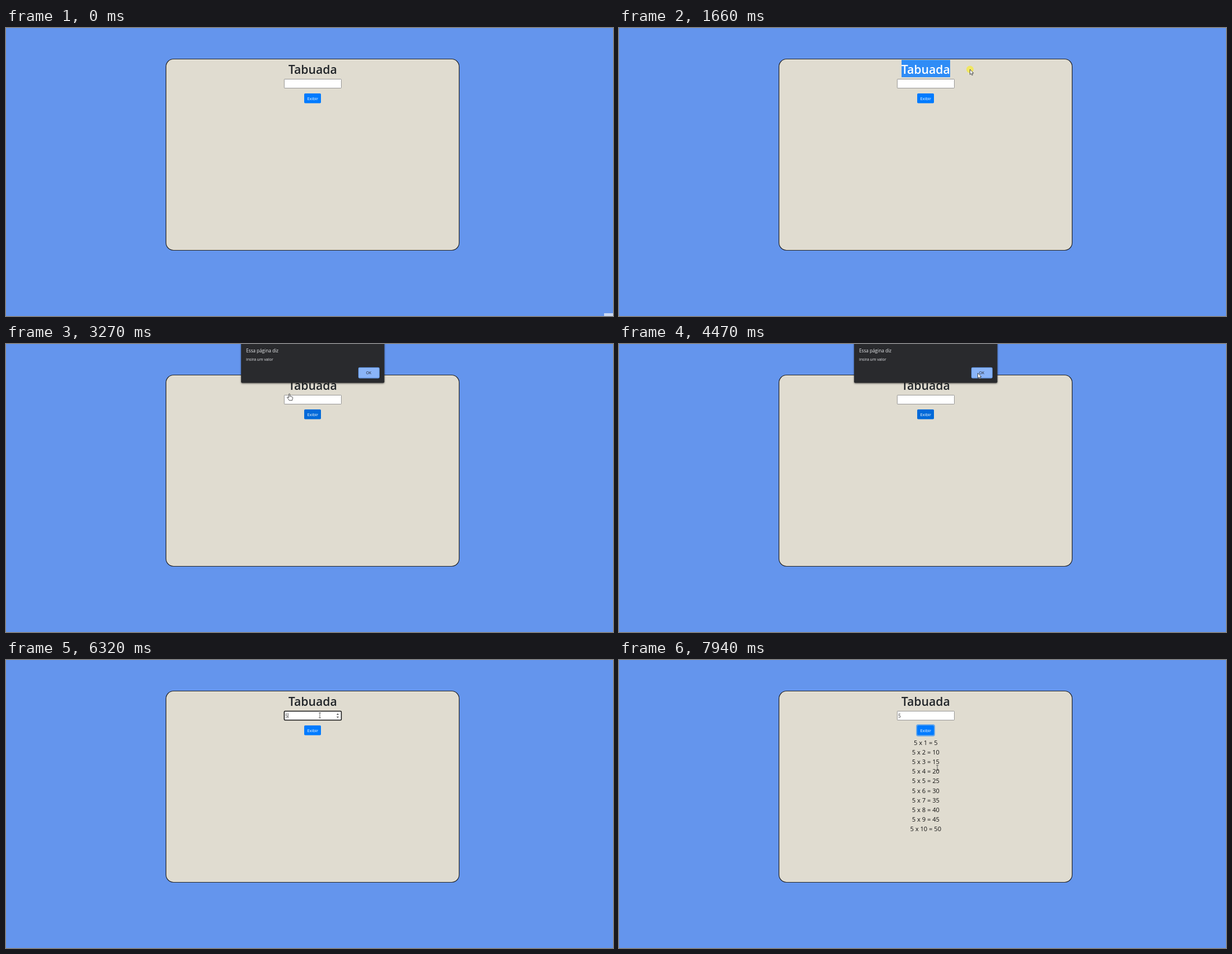
An HTML page for the animation above (8 s loop, 1087 by 515 pixels).

```html
<!DOCTYPE html>
<html lang="pt">
<head>
<meta charset="utf-8">
<title>Tabuada</title>
<style>
  html, body { margin: 0; width: 100%; height: 100%; overflow: hidden; background: #6495ed; }
  svg { display: block; font-family: "Open Sans", "Noto Sans", sans-serif; }
  .mid { text-anchor: middle; }
  .h1 { font-size: 21.2px; font-weight: 600; }
  #dialog { filter: drop-shadow(0 1px 1.5px rgba(0, 0, 0, .6)); }
</style>
</head>
<body>
<svg width="1087" height="515" viewBox="0 0 1087 515">
  <defs><clipPath id="clip"><rect id="clipRect" x="506" y="57" height="31"/></clipPath></defs>
  <rect id="corner" x="1071" y="510" width="16" height="5" fill="#cbdaf4"/>
  <rect x="286.5" y="55.5" width="525" height="342" rx="13.5" fill="#e0dcd0" stroke="#202226" stroke-width="1.2"/>

  <text class="mid h1" x="549.3" y="81.8" fill="#212529">Tabuada</text>
  <g clip-path="url(#clip)">
    <rect x="506" y="57" width="87" height="31" fill="#2f8cf6"/>
    <text class="mid h1" x="549.3" y="81.8" fill="#fff">Tabuada</text>
  </g>

  <rect id="field" x="498.3" y="91.5" width="102.2" height="16" fill="#fff"/>
  <text id="digit" x="500" y="103" font-size="8.4" fill="#333">5</text>
  <path id="caret" d="M0 95V104" stroke="#222" stroke-width=".7"/>
  <path id="spin" d="M591.8 98l2.2-2.4 2.2 2.4zM591.8 101.3l2.2 2.4 2.2-2.4z" fill="#505050"/>

  <rect id="ring" x="533.1" y="116" width="31.8" height="19.4" rx="2.6" fill="none" stroke="#007bff" stroke-opacity=".55" stroke-width="2"/>
  <rect id="button" x="534" y="117" width="30" height="17.5" rx="1.8"/>
  <text class="mid" x="549.2" y="128.8" font-size="7.5" fill="#fff">Exibir</text>
  <g id="rows" class="mid" font-size="11.1" fill="#111"></g>

  <g id="dialog">
    <path d="M421-20H677.5V67.5q0 2-2 2H423q-2 0-2-2Z" fill="#292a2d"/>
    <text x="430" y="14.5" font-size="8.2" fill="#e8eaed">Essa página diz</text>
    <text x="430" y="30.4" font-size="7" fill="#e8eaed">insira um valor</text>
    <rect x="631.5" y="42.3" width="36.8" height="18.5" rx="1.8" fill="#8ab4f8" stroke="#6a9ff0" stroke-width="1.2"/>
    <text class="mid" x="649.5" y="54" font-size="6.8" fill="#202124">OK</text>
  </g>

  <g id="cursor" stroke-linejoin="round">
    <circle id="halo" r="6.5" fill="#f5ea3c" opacity=".75"/>
    <path id="arrow" d="M0 0V9.2L2.1 7.3 3.5 10.5 5 9.8 3.7 6.8H6.5Z" fill="#fff" stroke="#222" stroke-width=".8"/>
    <path id="hand" d="M-1 1a1 1 0 0 1 2 0V4.5l3.6.8q1.4.4 1.4 2q0 2-1 3.5v1H-.3Q-2 9-3.8 7q-.6-1 .3-1.3q.8-.2 2.5 1.3Z" fill="#fff" stroke="#222" stroke-width=".8"/>
    <path id="beam" d="M-2-4.5H2M-2 4.5H2M0-4.5V4.5" fill="none" stroke="#444" stroke-width=".8"/>
  </g>
</svg>
<script>
const LOOP = 8000;
const $ = id => document.getElementById(id);
const set = (id, attrs) => { for (const k in attrs) $(id).setAttribute(k, attrs[k]); };
const show = (id, on) => { $(id).style.display = on ? '' : 'none'; };
const clamp = v => Math.max(0, Math.min(1, v));
const between = (v, a, b) => v >= a && v < b;
const ease = p => p * p * (3 - 2 * p);

// Places the pointer visits
const corner = [1083, 505], title = [566, 78], left = [481.5, 75], right = [628.5, 74],
  field = [562, 99], button = [549.5, 123], message = [427, 24], ok = [642.5, 52],
  above = [536.8, 110.5], beside = [591, 171], row = [570, 193];

// Pointer moves: start, end, destination
const moves = [
  [70, 820, title], [820, 960, left], [1160, 1500, right], [1720, 2150, field],
  [2300, 2710, button], [2960, 3750, message], [3750, 4400, ok], [4620, 4870, above],
  [4940, 5150, field], [6400, 6800, button], [7150, 7800, beside], [7800, 7940, row]
];

function pointer(t) {
  let [x, y] = corner;
  for (const [start, end, [px, py]] of moves) {
    const p = ease(clamp((t - start) / (end - start)));
    x += (px - x) * p;
    y += (py - y) * p;
  }
  return [x, y];
}

for (let i = 1; i <= 10; i++)
  $('rows').insertAdjacentHTML('beforeend',
    `<text x="549.3" y="${134.65 + 17.15 * i}">5 x ${i} = ${5 * i}</text>`);

function draw(t) {
  const [x, y] = pointer(t);
  const over = (x0, y0, x1, y1) => between(x, x0, x1) && between(y, y0, y1);
  const alert = between(t, 2850, 4740);
  const focus = between(t, 5150, 7030);
  const typed = t >= 6250;
  const done = t >= 7090;
  const onButton = !alert && over(534, 117, 564, 134.5);
  const onField = !alert && over(498, 91, 601, 108);
  const onText = !alert && (over(506, 60, 593, 87) || done && over(521, 140, 577, 310));

  show('corner', t < 210);

  const letters = between(t, 1160, 1800) ? Math.round(clamp((x - 506) / 87) * 7) : 0;
  set('clipRect', { width: letters * 87 / 7 });

  set('field', { stroke: focus ? '#101010' : '#808080', 'stroke-width': focus ? 1.5 : .8, rx: focus ? 1.5 : .8 });
  show('spin', focus || onField);
  show('digit', typed);
  show('caret', focus && (t - (typed ? 6250 : 5150)) % 1060 < 530);
  set('caret', { transform: `translate(${typed ? 505.2 : 501})` });

  set('button', { fill: alert || onButton ? '#0069d9' : '#007bff' });
  show('ring', between(t, 4740, 5150) || t >= 7030);
  show('rows', done);

  const open = Math.min(clamp((t - 2850) / 280), clamp((4740 - t) / 140));
  show('dialog', open > 0);
  set('dialog', { opacity: open ** 1.25, transform: `translate(0 ${-12 * (1 - open)})` });

  const kind = alert ? (y > 70 ? 'hand' : 'arrow')
    : onButton ? 'hand' : onField || onText ? 'beam' : 'arrow';
  for (const k of ['arrow', 'hand', 'beam']) show(k, k === kind);
  show('halo', between(t, 1160, 1720) || between(t, 4540, 4610));
  show('cursor', t >= 70);
  set('cursor', { transform: `translate(${x} ${y})` });
}

const start = performance.now();
function tick() {
  draw((performance.now() - start) % LOOP);
  requestAnimationFrame(tick);
}
tick();
</script>
</body>
</html>
```
